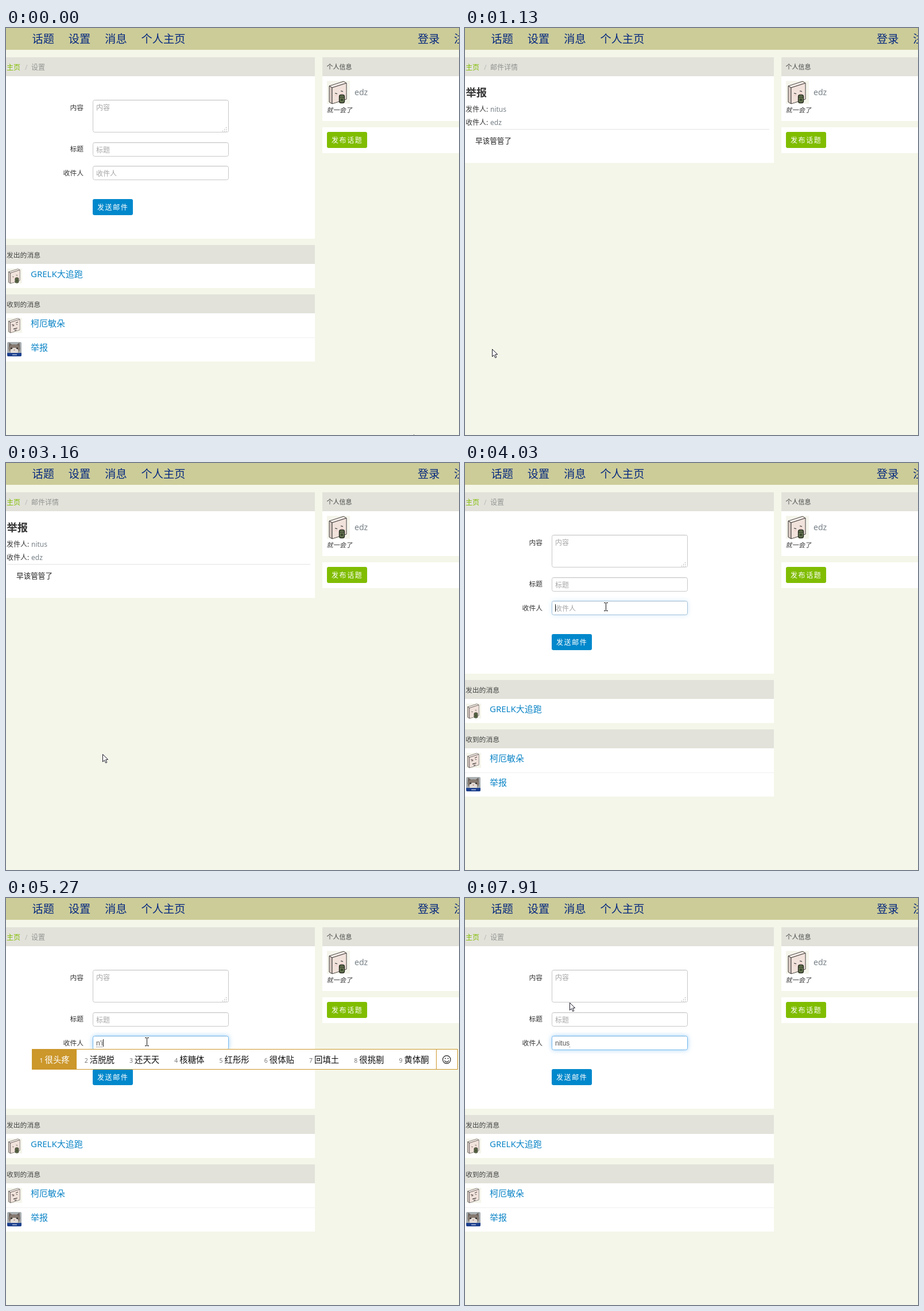
Animation of 789 by 709 pixels, one loop 7.99 s. Source, as an HTML page with a canvas:

```html
<!DOCTYPE html>
<html lang="zh-CN">
<head>
<meta charset="utf-8">
<title>消息</title>
<style>
html, body { margin: 0; width: 100%; height: 100%; overflow: hidden; background: #f4f6e9; }
canvas { display: block; }
</style>
</head>
<body>
<canvas id="stage" width="789" height="709"></canvas>
<script>
const LOOP = 7990, MAIL_OPENS = 1130, MAIL_CLOSES = 3400, FOCUS = 3950;
const ctx = document.getElementById('stage').getContext('2d');
const UI = '"Noto Sans", "Noto Sans CJK SC", "Noto Sans CJK", "Noto Sans CJK JP", sans-serif';
const ARIAL = '"Liberation Sans", Arial, "Noto Sans CJK SC", sans-serif';
const OWNER = 'edz', SENDER = 'nitus';
const GOLD = '#cc972b', LINK = '#0a84c6', GREEN = '#80bd01', HEAD = '#e2e2da';
const INK = '#45403e', DARK = '#333', GREY = '#929292';

// Each leg leads on from the one before it
const LEGS = [
  { from: 0, to: 440, x: 45, y: 549 },
  { from: 590, to: 980, x: 47, y: 559 },
  { from: 1535, to: 1910, x: 66, y: 587 },
  { from: 2020, to: 2230, x: 71, y: 571 },
  { from: 2852, to: 3710, x: 243, y: 268, bend: 0.19 },
  { from: 3870, to: FOCUS, x: 245, y: 250 },
  { from: 7510, to: 7750, x: 128, y: 91 },
  { from: 7750, to: 7910, x: 182, y: 182 }
];

const TYPING = [
  { at: 4960, done: '', draft: 'n' },
  { at: 5270, done: '', draft: "n'i" },
  { at: 5340, done: '', draft: "n'i't" },
  { at: 5420, done: '', draft: "n'i't'u" },
  { at: 5590, done: 'nitu', draft: '' },
  { at: 6200, done: 'nitu', draft: 's' },
  { at: 6440, done: SENDER, draft: '' }
];

function candidates({ done, draft }) {
  if (done) return [...'是说上三时四十谁啥'];
  if (draft.length === 1) return '好 哈哈 还是 会 或者 后来 还有 孩子 回来'.split(' ');
  return '很头疼 活脱脱 还天天 核糖体 红彤彤 很体贴 回填土 很挑剔 黄体酮'.split(' ');
}

function rect(x, y, w, h, color) {
  ctx.fillStyle = color;
  ctx.fillRect(x, y, w, h);
}

function paint(fill, stroke, width = 1) {
  if (fill) {
    ctx.fillStyle = fill;
    ctx.fill();
  }
  if (stroke) {
    ctx.strokeStyle = stroke;
    ctx.lineWidth = width;
    ctx.stroke();
  }
}

function rounded(x, y, w, h, r, ...look) {
  ctx.beginPath();
  ctx.roundRect(x, y, w, h, r);
  paint(...look);
}

function oval(x, y, rx, ry, ...look) {
  ctx.beginPath();
  ctx.ellipse(x, y, rx, ry, 0, 0, 7);
  paint(...look);
}

function poly(points, ...look) {
  ctx.beginPath();
  points.forEach(([x, y]) => ctx.lineTo(x, y));
  ctx.closePath();
  paint(...look);
}

// Parallelogram from a corner and two sides
function slant(x, y, ax, ay, bx, by, ...look) {
  poly([[x, y], [x + ax, y + ay], [x + ax + bx, y + ay + by], [x + bx, y + by]], ...look);
}

function at(x, y, scale, draw) {
  ctx.save();
  ctx.translate(x, y);
  ctx.scale(scale, scale);
  draw();
  ctx.restore();
}

// cy is the vertical middle of a Chinese character; returns the width
function text(str, x, cy, size, color, { weight = 400, family = UI, gap = 0, align = 'left', lean = 0 } = {}) {
  ctx.save();
  ctx.font = `${weight} ${size}px ${family}`;
  ctx.letterSpacing = gap + 'px';
  ctx.textAlign = align;
  ctx.fillStyle = color;
  ctx.translate(x, Math.round(cy + size * 0.38));
  ctx.transform(1, 0, -lean, 1, 0, 0);
  ctx.fillText(str, 0, 0);
  const { width } = ctx.measureText(str);
  ctx.restore();
  return width;
}

function block(x, y, scale, cup) {
  at(x, y, scale, () => {
    rect(0, 0, 40, 40, '#f5f5ec');
    slant(4, 9, 25, -8, 5, 3, '#f8eee9', INK);
    slant(4, 9, 5, 3, 0, 28, '#d9cbc5', INK);
    slant(9, 12, 25, -8, 0, 28, '#f1e2dc', INK);
    slant(10, 13, 23, -7.5, 0, 26, '#f1e2dc');
    for (const right of [0, 1]) {
      const ex = 14 + 10 * right, ey = 21 - 4 * right;
      slant(ex, ey, 4, cup ? 1 : 0, 0, 1.2, INK);
      if (cup) rect(ex, ey + 4, 4, 1.5, '#f3cdc6');
      else slant(ex - 1, ey - 4, 6, 2 - 5 * right, 0, 1.8, INK);
    }
    if (cup) {
      rounded(21.5, 24.5, 9, 14, 3, '#65744f', '#262b21', 1.3);
      rect(22, 28, 8, 1, '#30372a');
      rect(24, 31, 4, 4, '#3d482f');
    } else {
      slant(17, 29, 10, -3, 0, 2, INK);
      slant(20, 33, 5, -2, 0, 2, INK);
    }
  });
}

function cat(x, y) {
  at(x, y, 1, () => {
    ctx.beginPath();
    ctx.roundRect(0, 0, 25, 25, 2);
    ctx.clip();
    rect(0, 0, 25, 25, '#a9afb2');
    for (const side of [-1, 1]) {
      poly([[12.5 + side * 2, 6], [12.5 + side * 9, 1], [12.5 + side * 10, 12]], '#6f655f');
    }
    oval(12.5, 12, 10, 8, '#857970');
    oval(12.5, 16, 7, 6, '#e2dcd6');
    for (const side of [-1, 1]) oval(12.5 + side * 5, 11, 1.6, 1.3, '#2e2a28');
    oval(12.5, 14, 1.2, 0.9, '#b4837c');
    rect(0, 19, 25, 6, '#1c3f8d');
    rect(9, 21.5, 8, 1.5, '#a9b8d8');
  });
}

function button(x, y, label, color) {
  rounded(x, y, 70, 28, 3, color);
  text(label, x + 8, y + 14.5, 12, '#fff', { gap: 1.6 });
}

function field(y, h, hint, focus = 0) {
  const mix = (a, b) => Math.round(a + (b - a) * focus);
  ctx.save();
  ctx.shadowColor = `rgba(82,168,236,${0.6 * focus})`;
  ctx.shadowBlur = 8;
  rounded(151.5, y + 0.5, 236, h - 1, 3, '#fff');
  ctx.restore();
  rect(153, y + 1, 233, 1, '#f0f0f0');
  rounded(151.5, y + 0.5, 236, h - 1, 3, null, `rgb(${mix(200, 117)},${mix(200, 185)},${mix(200, 238)})`);
  text(hint, 157, y + 13, 12, '#a6a6a6');
}

function nav(x, labels) {
  for (const label of labels) x += text(label, x, 18.5, 19.2, '#06297f') + 25;
}

function frame() {
  rect(0, 0, 789, 709, '#f4f6e9');
  rect(0, 0, 789, 38, '#cccc99');
  nav(45.5, ['话题', '设置', '消息', '个人主页']);
  nav(717, ['登录', '注册']);

  rect(551, 51, 238, 33, HEAD);
  text('个人信息', 558.5, 67.5, 11, '#444');
  rect(551, 84, 238, 78, '#fff');
  block(559, 92, 1, true);
  text(OWNER, 607, 111.5, 14, '#778087');
  text('就一会了', 558.5, 143, 11.2, DARK, { lean: 0.2 });
  rect(551, 173, 238, 45, '#fff');
  button(559, 181, '发布话题', GREEN);
}

function crumbs(label, height) {
  rect(0, 51, 538, 33, HEAD);
  text('主页', 1, 68, 12, GREEN);
  text('/', 33, 68, 12, '#bbb');
  text(label, 44, 68, 12, GREY);
  rect(0, 84, 538, height, '#fff');
}

function section(y, title, rows) {
  rect(0, y, 538, 33, HEAD);
  text(title, 1, y + 17.5, 11.8, '#444');
  rows.forEach(([label, avatar], i) => {
    const top = y + 33 + 42 * i;
    rect(0, top, 538, 42, '#fff');
    if (i) rect(0, top, 538, 1, '#f0f0f0');
    text(label, 43, top + 17, 15, LINK);
    avatar(2, top + 8);
  });
}

function smiley(x, y) {
  oval(x, y, 6.8, 6.8, null, '#222', 1.2);
  ctx.beginPath();
  ctx.arc(x, y + 0.5, 3.7, 0.25, Math.PI - 0.25);
  paint(null, '#222', 1.2);
  for (const side of [-1, 1]) oval(x + side * 2.4, y - 2, 0.9, 0.9, '#222');
}

function candidateBar(anchor, words) {
  const slot = w => 35.65 + 14.2 * w.length;
  const span = Math.floor(words.reduce((sum, w) => sum + slot(w), 0));
  const left = Math.min(anchor, 749 - span), split = left + span;
  rect(left, 263, span + 38, 36, GOLD);
  rect(left + 1, 264, span + 36, 34, '#fff');
  rect(left, 263, Math.round(slot(words[0])), 36, GOLD);
  rect(split, 263, 1, 36, GOLD);
  let x = left;
  words.forEach((w, i) => {
    text(i + 1, x + 13.5, 283, 10.5, i ? '#777' : '#fff');
    text(w, x + 22.5, 282, 14.4, i ? '#111' : '#fff');
    x += slot(w);
  });
  smiley(split + 18.5, 281.5);
}

function recipient(t) {
  const state = TYPING.findLast(s => s.at <= t) || { done: '', draft: '' };
  const write = (str, x) => x + text(str, x, 252.5, 12, '#555', { family: ARIAL });
  const start = write(state.done, 157), end = write(state.draft, start);
  for (let x = Math.round(start); x < end; x += 2) rect(x, 259, 1, 1, '#555');
  const blink = Math.floor((t - FOCUS + 15) / 533);
  if (blink >= 0 && blink % 2 === 0) rect(Math.round(end), 246, 1, 13, '#222');
  if (state.draft) candidateBar(Math.ceil(start) - 2, candidates(state));
}

function formPage(t) {
  crumbs('设置', 283);
  const label = (str, y) => text(str, 135, y, 11.8, DARK, { align: 'right' });
  label('内容', 139);
  label('标题', 211);
  label('收件人', 253);
  field(125, 57, '内容');
  for (let i = 0; i < 3; i++)
    for (let j = 0; j <= i; j++) rect(383 - 3 * j, 173 + 3 * i, 1, 1, '#888');
  field(199, 25, '标题');
  const focus = Math.max(0, Math.min(1, (t - FOCUS + 30) / 240));
  field(240, 25, t < TYPING[0].at ? '收件人' : '', focus);
  button(151, 298, '发送邮件', '#08c');

  section(378, '发出的消息', [['GRELK大追跑', (x, y) => block(x, y, 0.65, true)]]);
  section(464, '收到的消息', [['柯厄敏朵', (x, y) => block(x, y, 0.65, false)], ['举报', cat]]);
  recipient(t);
}

function mailPage() {
  crumbs('邮件详情', 151);
  text('举报', 1.5, 112, 18.3, DARK, { weight: 700 });
  [['发件人:', SENDER], ['收件人:', OWNER]].forEach(([label, name], i) => {
    text(label, 1, 141.5 + 23 * i, 12, DARK);
    text(name, 44, 141.5 + 23 * i, 12, '#778087');
  });
  rect(2, 176, 528, 1, '#e4e4e4');
  text('早该管管了', 18, 196, 12.6, '#222');
}

function cursorAt(t) {
  let x = 710, y = 708;
  for (const leg of LEGS) {
    if (t < leg.from) break;
    const span = leg.to - leg.from, n = Math.round(span / 78);
    const u = Math.min(1, Math.floor((t - leg.from) / span * n + 0.05) / n) ** 1.2;
    const dx = leg.x - x, dy = leg.y - y, bow = (leg.bend || 0) * Math.sin(Math.PI * u);
    x += dx * u - dy * bow;
    y += dy * u + dx * bow;
  }
  return [Math.round(x), Math.round(y)];
}

function beam() {
  rect(0, -6, 1, 13, '#111');
  for (const y of [-7, 7])
    for (const x of [-3, 1]) rect(x, y, 3, 1, '#111');
}

function hand() {
  rounded(-4.5, 8.5, 14, 12, 4, '#fff', '#111');
  rounded(-1.5, 0.5, 3, 13, 1.5, '#fff', '#111');
  rect(-1, 9, 2, 6, '#fff');
}

function arrow() {
  poly([[0.5, 0.5], [0.5, 13.5], [3.5, 10.7], [5.7, 15.5], [7.8, 14.6], [5.7, 9.8], [9.7, 9.6]], '#fff', '#1a1a2a');
}

function pointer(x, y, onForm) {
  const within = (top, bottom) => y >= top && y < bottom;
  const inField = x > 151 && x < 388 && (within(125, 181) || within(199, 224) || within(240, 265));
  const onLink = x < 58 && y > 547;
  at(x, y, 1, onForm && inField ? beam : onForm && onLink ? hand : arrow);
}

function draw(t) {
  const onForm = t < MAIL_OPENS || t >= MAIL_CLOSES;
  frame();
  if (onForm) formPage(t);
  else mailPage();
  pointer(...cursorAt(t), onForm);
}

const begin = performance.now();
function tick() {
  draw((performance.now() - begin) % LOOP);
  requestAnimationFrame(tick);
}
tick();
</script>
</body>
</html>
```
